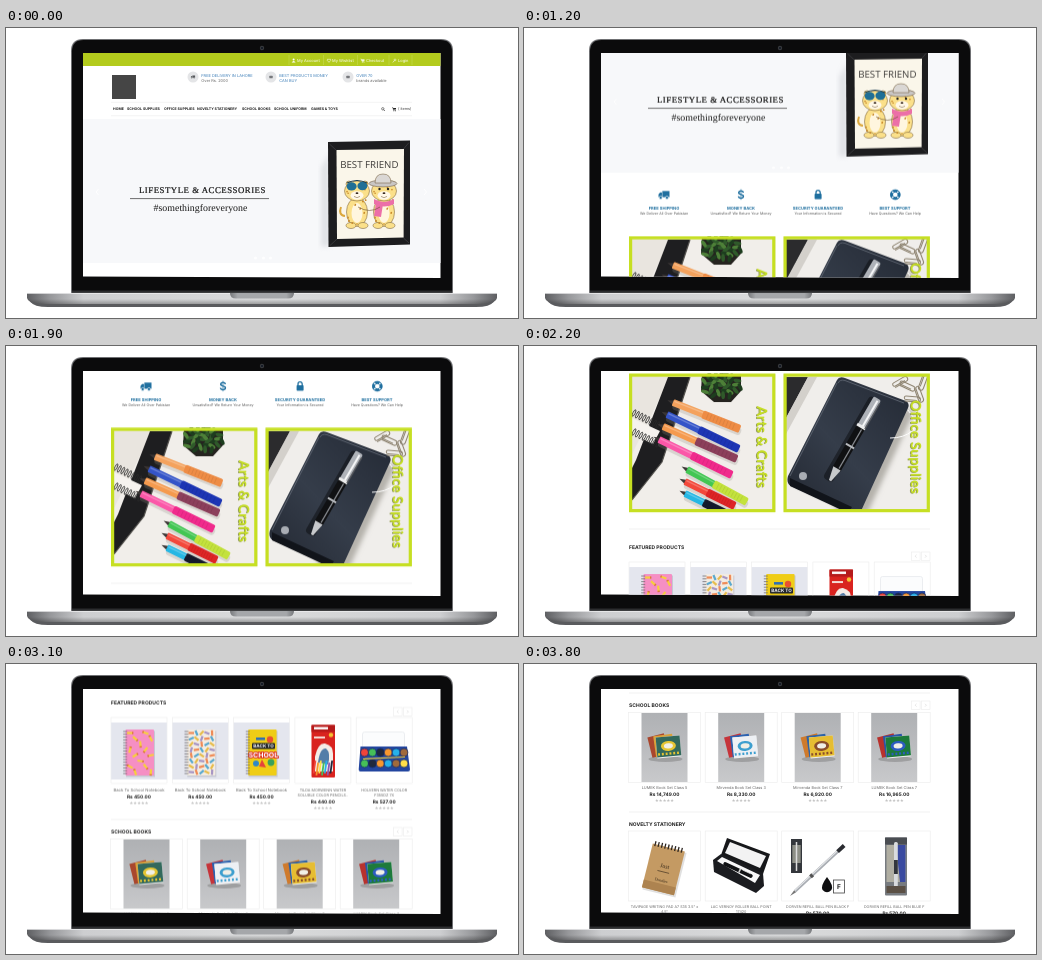
An HTML page for the animation above (5.8 s loop, 512 by 290 pixels).

```html
<!DOCTYPE html>
<html lang="en">
<head>
<meta charset="utf-8">
<title>Stationery shop on a laptop</title>
<style>
html, body { margin: 0; width: 100%; height: 100%; overflow: hidden; background: #fff; }
svg { display: block; width: 512px; height: 290px; }
text { font-family: Inter, "Open Sans", sans-serif; white-space: pre; text-rendering: geometricPrecision; }
.serif { font-family: "Liberation Serif", "Noto Serif", serif; }
.lato { font-family: Lato, "Open Sans", sans-serif; font-weight: 700; }
.hand { font-family: "Open Sans", Lato, sans-serif; }
.b { font-weight: 700; }
.m { text-anchor: middle; }
</style>
</head>
<body>
<svg id="stage" viewBox="0 0 512 290" xmlns="http://www.w3.org/2000/svg"></svg>
<script>
const LOOP = 5800, SCROLL = 560;
const BLUE = '#1f6f9f', LIME = '#c6df22', INK = '#1c1c1c', GREY = '#686868';

// drawing helpers, each returns markup
const rect = (x, y, w, h, fill, more = '') =>
  `<rect x="${x}" y="${y}" width="${w}" height="${h}" fill="${fill}" ${more}/>`;
const box = (x, y, w, h, stroke = '#ececec', more = '') =>
  rect(x, y, w, h, 'none', `stroke="${stroke}" stroke-width=".6" ${more}`);
const oval = (x, y, rx, ry, fill, more = '') =>
  `<ellipse cx="${x}" cy="${y}" rx="${rx}" ry="${ry}" fill="${fill}" ${more}/>`;
const dot = (x, y, r, fill, more) => oval(x, y, r, r, fill, more);
const shape = (d, fill, more = '') => `<path d="${d}" fill="${fill}" ${more}/>`;
const line = (d, stroke, w = 1, more = '') =>
  `<path d="${d}" fill="none" stroke="${stroke}" stroke-width="${w}" ${more}/>`;
const text = (x, y, size, str, fill = INK, cls = '', more = '') =>
  `<text x="${x}" y="${y}" font-size="${size}" fill="${fill}" class="${cls}" ${more}>${str.replace(/&/g, '&amp;')}</text>`;
const at = (x, y, body, turn = 0) => `<g transform="translate(${x} ${y}) rotate(${turn})">${body}</g>`;
const many = (n, fn) => Array.from({ length: n }, (_, i) => fn(i)).join('');
const rule = y => line(`M105 ${y}H406`, '#ebebeb', .7);

const truck = (x, y, s, c) => at(x, y, `<g transform="scale(${s})">` +
  rect(-1.5, -3.6, 6.5, 5.6, c) + shape('M-5 2V-.4L-3.6-2.4H-1.9V2Z', c) +
  dot(-3, 2.4, 1.4, c, 'stroke="#fff" stroke-width=".5"') +
  dot(2.7, 2.4, 1.4, c, 'stroke="#fff" stroke-width=".5"') + '</g>');
const cart = (x, y, c) => line(`M${x - 2} ${y - 1.6}h.9l.6 2.3h2`, c, .5) +
  rect(x - .9, y - 1.2, 2.9, 1.4, c) + dot(x - .2, y + 1.5, .5, c) + dot(x + 1.5, y + 1.5, .5, c);

function header() {
  const links = [[291, 'My Account'], [326, 'My Wishlist'], [360, 'Checkout'], [392, 'Login']];
  const perks = [
    [187, 'FREE DELIVERY IN LAHORE', 'Over Rs. 2000', GREY],
    [265, 'BEST PRODUCTS MONEY', 'CAN BUY', '#3f7fb8'],
    [342, 'OVER 70', 'brands available', GREY]];
  const menu = [[107, 'HOME'], [121, 'SCHOOL SUPPLIES'], [158, 'OFFICE SUPPLIES'],
    [191, 'NOVELTY STATIONERY'], [236, 'SCHOOL BOOKS'], [268, 'SCHOOL UNIFORM'], [305, 'GAMES & TOYS']];
  return rect(76, 24, 360, 14, '#b3cb1d') +
    [283, 317.5, 351.5, 383, 406].map(x => line(`M${x} 27V37`, '#c9db5c', .5)).join('') +
    links.map(([x, s]) => text(x, 34.1, 4, s, '#fff')).join('') +
    dot(287.6, 31.6, 1, '#fff') + shape('M285.6 34.6q2-3.4 4 0Z', '#fff') +
    shape('M323 34.3l-1.9-2.1q.3-2 1.9-.7q1.6-1.3 1.9.7Z', 'none', 'stroke="#fff" stroke-width=".5"') +
    cart(356.5, 32.6, '#fff') + dot(389, 31.9, .9, 'none', 'stroke="#fff" stroke-width=".5"') +
    line('M388.4 32.6l-1.6 1.8', '#fff', .6) +
    rect(106, 47, 24, 24, '#454545') +
    perks.map(([x, a, b, c], i) => dot(x, 49, 5.5, '#e4e5e7') +
      (i ? rect(x - 1.7, 47.8, 3.4, 2.5, '#77797d', 'rx=".5"') : truck(x, 49, .42, '#55575b')) +
      text(x + 8.3, 49, 3.95, a, '#3f7fb8') + text(x + 8.3, 54, 3.95, b, c)).join('') +
    line('M105 74.3H406M105 87.7H406', '#ececec', .6) +
    menu.map(([x, s]) => text(x, 82.4, 3.55, s, INK, 'b')).join('') +
    dot(376.8, 80.8, 1.2, 'none', 'stroke="#333" stroke-width=".6"') + line('M377.6 81.7l1.3 1.3', '#333', .7) +
    cart(388, 81.2, '#222') + text(392, 82.4, 3.8, '( items)', '#444');
}

function leopards() {
  const fur = '#fbe08a', edge = 'stroke="#6b5230" stroke-width=".5"';
  const spots = (x, y, w, h, n) => many(n, i =>
    dot(x + w * Math.sin(i * 2.4), y + h * Math.cos(i * 3.7), .8, '#c98a2b'));
  const body = (x, y) => dot(x - 8, y - 7, 3, fur, edge) + dot(x + 8, y - 7, 3, fur, edge) +
    oval(x, y + 21, 10.5, 14.5, fur, edge) + oval(x, y + 22, 5.5, 10, '#fff6df') +
    oval(x - 6, y + 34.5, 5, 3, fur, edge) + oval(x + 6, y + 34.5, 5, 3, fur, edge) +
    spots(x, y + 21, 9, 12, 17) + oval(x, y, 12.5, 10, fur, edge) + spots(x, y - 2, 10, 6, 9) +
    oval(x, y + 4.5, 6.5, 4.2, '#fff8e8') + oval(x, y + 2.2, 1.4, .9, '#3a2a20') +
    line(`M${x - 3} ${y + 5.4}q3 2.6 6 0`, '#6b5230', .5);
  return line('M339 188q-7-1-4-9', '#dba73c', 2) + body(351, 163) + body(378, 163) +
    oval(345.6, 158.4, 5, 4.2, '#1f6f96') + oval(356.4, 158, 5, 4.2, '#1f6f96') +
    line('M341 155q10-5 20 0', '#163b54', 1.2) +
    oval(377, 155.5, 14, 3.4, '#c9c6c4', edge) + shape('M369 155q0-9 8-9q8 0 8 9Z', '#dad7d4', edge) +
    dot(373.5, 161, 1.2, '#222') + dot(382, 161, 1.2, '#222') +
    shape('M368 171q10 6 20 0v5q-10 5-20 0Z', '#ec6fa8') + shape('M370 175l7 1l-2 13l-7-1Z', '#ec6fa8') +
    line('M352 179q12 7 22 0', '#6b5230', .6);
}

function hero() {
  return rect(76, 91, 360, 144, '#f7f8fa') +
    shape('M323 125L315 140V219L324 218Z', '#c9ccd2', 'filter="url(#soft)" opacity=".5"') +
    shape('M322 114L404 112.5V216.5L322.5 219Z', '#1d1d1f') +
    line('M323.5 116L330 122M403 114.5L397.5 121M403 215L397.5 210M324 217.5L331 211', '#4b4b4e', .6) +
    shape('M330.5 122L398 121L397.6 209.5L331 211Z', '#faf6ea') +
    text(334.2, 140, 9.7, 'BEST FRIEND', '#3c3a38', 'hand') + leopards() +
    text(133, 165.2, 8.8, 'LIFESTYLE & ACCESSORIES', '#151515', 'serif',
      'letter-spacing=".5" stroke="#151515" stroke-width=".2"') +
    line('M124 170.6H263', '#333', .7) +
    text(147.6, 183, 9.9, '#somethingforeveryone', '#1a1a1a', 'serif') +
    line('M92.5 161l-2.5 3l2.5 3M418 161l2.5 3l-2.5 3', '#fff', 1) +
    [249.5, 257.5, 264.5].map(x => dot(x, 230, 1.6, '#fff', 'opacity=".8"')).join('');
}

function services() {
  const items = [
    [140, 'FREE SHIPPING', 'We Deliver All Over Pakistan'],
    [217, 'MONEY BACK', 'Unsatisfied? We Return Your Money'],
    [294, 'SECURITY GUARANTEED', 'Your Information is Secured'],
    [371, 'BEST SUPPORT', 'Have Questions? We Can Help']];
  return truck(140, 257.3, 1.1, BLUE) + text(217, 261, 11.4, '$', BLUE, 'm', 'font-weight="600"') +
    rect(290.6, 256, 7, 5.4, BLUE, 'rx=".7"') +
    line('M292 256.5v-1.8a2.1 2.1 0 0 1 4.2 0v1.8', BLUE, 1.3) +
    dot(371.3, 257, 3.7, 'none', `stroke="${BLUE}" stroke-width="2.8"`) +
    many(4, i => at(371.3, 257, line('M2.8 0H4.5', '#fff', 1.3), 45 + 90 * i)) +
    dot(371.3, 257, 4.9, 'none', `stroke="${BLUE}" stroke-width=".7"`) +
    items.map(([x, a, b]) => text(x, 271.7, 4.1, a, BLUE, 'b m') + text(x, 277.3, 3.6, b, '#555', 'm')).join('');
}

// lime lettering running down a banner, with a darker shadow
const downward = (x, y, size, str) => at(x, y,
  text(.5, .7, size, str, '#6f7d1a', 'lato', 'opacity=".7"') + text(0, 0, size, str, LIME, 'lato'), 90);

// both banners use the same 146 by 138 frame
function crafts() {
  const pen = (x, y, x2, y2, front, back) => {
    const len = Math.hypot(x2 - x, y2 - y);
    return at(x, y, rect(2, -1, len, 7.5, '#8a8680', 'opacity=".25" rx="3"') +
      shape('M-5 0L3-2.6V2.6Z', '#3b3635') + rect(1, -3.5, len * .5, 7, front, 'rx="1"') +
      rect(len * .45, -4.2, len * .55, 8.4, back, 'rx="1.8"') + rect(2, -2.2, len * .42, 1.4, '#fff', 'opacity=".25"') +
      many(9, i => line(`M${len * (.52 + i * .048)}-3V3`, '#0002', .5)),
      Math.atan2(y2 - y, x2 - x) * 180 / Math.PI);
  };
  const coil = (x, y, n) => many(n, i =>
    at(x + i * 3.4, y + i * 1.7, oval(0, 0, 1.1, 3.6, 'none', 'stroke="#2a2a2a" stroke-width=".8"'), 28));
  return rect(105, 28, 147, 138, '#f1eeea') + shape('M108 31H146L108 108Z', '#e9e5df') +
    shape('M144 31H166L138 116L108 154V122L112 114Z', '#1e1e20') + line('M166 31L138 116L108 154', '#55534f', 1.2) +
    shape('M106 71l30 14l-7 13l-23-11Z', '#f6f3ef') + coil(110, 67, 8) + coil(110, 86, 8) +
    shape('M178 28H217V45L207 56H190L177 45Z', '#25231f') +
    many(34, i => at(197 + 20 * Math.sin(i * 2.4) * Math.sqrt(i / 34), 39 + 13 * Math.cos(i * 2.4) * Math.sqrt(i / 34),
      oval(0, 0, 4, 1.9, ['#2f5a2a', '#4d8038', '#1d3d1e'][i % 3]), i * 47)) +
    pen(148, 56, 216, 83, '#f4a25d', '#ee8c45') + pen(142, 68, 215, 103, '#3454c8', '#1d35b4') +
    pen(138, 80, 213, 113, '#f59a4e', '#8c3f5b') + pen(134, 93, 208, 129, '#fb57a8', '#f02a8c') +
    pen(162, 123, 223, 156, '#42c653', '#c3e23c') + pen(160, 135, 211, 160, '#f3483b', '#de2526') +
    pen(160, 147, 203, 168, '#26b7e4', '#151a2d') + downward(233, 60, 14.2, 'Arts & Crafts');
}

function office() {
  const clip = (x, y, turn) => at(x, y,
    line('M-7 2.5H6a2.5 2.5 0 0 0 0-5H-6a1.8 1.8 0 0 0 0 3.6H5', '#8d8370', 1), turn);
  const pen = rect(-46, -3, 95, 11, '#000', 'rx="4" opacity=".4"') +
    rect(-47, -4.2, 33, 8.4, '#aeb2b8', 'rx="2"') + rect(-45, -2.2, 30, 2, '#f5f6f7') +
    rect(-15, -4.6, 50, 9.2, '#101113') + rect(-12, -2.4, 45, 1.3, '#8a8d92') +
    rect(-16, -4.8, 3, 9.6, '#eceded') + rect(7, -4.7, 2, 9.4, '#b9bcc0') +
    shape('M34-4.2L48-1.2V1.2L34 4.2Z', '#c7c9cc') + line('M-44-4.4H-14', '#55585d', 1.4);
  return rect(259, 28, 148, 138, '#f0eeeb') +
    shape('M262 31H284L262 72Z', '#2b2b2d') + shape('M284 31H293L262 88V72Z', '#d3d0cb') +
    shape('M316 42L390 66L343 168H312Z', '#b5b2ac', 'filter="url(#soft)"') +
    shape('M313 34Q315 30 321 32L382 55Q386 57 384 62L337 165H324L267 140Q262 137 264 130Z', 'url(#leather)') +
    line('M314 37Q316 33 321 34.5L380 57M266 130L313 37', '#5a616d', 1) +
    shape('M266 132L328 161L324 167L266 140Z', '#11141a') + dot(279, 130, 4, '#a9adb4') +
    at(330, 93, pen, 120) +
    [[383, 40, 25], [395, 48, 70], [376, 36, -30], [399, 36, 110], [388, 53, 5]].map(c => clip(...c)).join('') +
    line('M384 64Q396 78 388 85T366 92', '#fff', 1) + downward(387, 54, 14, 'Office Supplies');
}

function banners() {
  const frame = x => rect(x + 1.6, 29.1, 143.2, 135.5, 'none', `stroke="${LIME}" stroke-width="3.2"`);
  const clip = x => `<clipPath id="c${x}">${rect(x, 27.5, 146.5, 138.5, '#000')}</clipPath>`;
  return at(0, 271, clip(105) + clip(259.5) +
    `<g clip-path="url(#c105)">${crafts()}</g><g clip-path="url(#c259.5)">${office()}</g>` +
    frame(105) + frame(259.5));
}

const stars = (x, y) => many(5, i => text(x - 7.6 + i * 3.8, y + 1.4, 4, '★', '#c4c4c4', 'm'));
const pager = y => box(387.5, y, 8.6, 8.4) + box(397.4, y, 8.6, 8.4) +
  line(`M392.5 ${y + 2.8}l-1.4 1.4l1.4 1.4M401 ${y + 2.8}l1.4 1.4l-1.4 1.4`, '#ccc', .5);
const heading = (y, s) => text(105, y, 5, s, INK, 'b');
function label(x, y, size, names, price) {
  const end = y + (names.length - 1) * 5.3;
  return names.map((s, i) => text(x, y + i * 5.3, size, s, GREY, 'm')).join('') +
    text(x, end + 7.4, 4.75, 'Rs ' + price, INK, 'b m') + stars(x, end + 11.6);
}

function notebook(x, cover, art) {
  return rect(x - 27.8, 58, 55.6, 57, '#e4e6ee') + rect(x - 13, 66.5, 29, 46, '#9a9caa', 'opacity=".4"') +
    rect(x - 13.5, 65, 28.5, 46, cover, 'rx="1"') + art +
    many(16, i => line(`M${x - 15.8} ${67 + i * 2.8}h4`, '#6e6a70', .8));
}

function featured() {
  const xs = [133, 194.3, 255.6, 316.9, 378.2];
  const grid = (x, fn) => many(40, i => at(x - 9 + (i % 5) * 5.2, 68.5 + (i / 5 | 0) * 5.6, fn(i), i * 67));
  const paints = ['#f0443a', '#f8972e', '#ffe04a', '#46bf58', '#27b0ea', '#8e57b4', '#20283d', '#a06a3c'];
  const pink = grid(133, i => i % 3 ? '' : rect(-3, -1.1, 6, 2.2, '#f7cf3d') + rect(2, -1.1, 1.4, 2.2, '#d9743e'));
  const mixed = grid(194.3, i => rect(-2.7, -1.1, 5.4, 2.2, ['#ef8b57', '#5aa9cf', '#e7bd4d', '#a795c4'][i % 4]));
  const school = rect(246, 78.5, 23, 6, '#23262b', 'rx="1"') + text(257.5, 83.3, 4.6, 'BACK TO', '#fff', 'b m') +
    text(257.3, 92.5, 7, 'SCHOOL', '#fff', 'b m', 'stroke="#dd3029" stroke-width="1.8" paint-order="stroke"') +
    dot(264, 75, 3.2, '#e8512f') + dot(250, 99, 3, '#3088c7') + dot(265, 98, 3.4, '#3ba15a') +
    shape('M256 95l4 8l-7-1Z', '#e5433b') + rect(250, 73, 9, 2.6, '#2d6fb4');
  const pencils = rect(305.5, 60.5, 23.5, 52.5, '#d9231f', 'rx="1"') + rect(305.5, 60.5, 23.5, 7, '#b51a1a') +
    rect(308, 62.5, 14, 2.4, '#fff') + dot(325, 70.5, 2.2, '#f5c332') + rect(308, 72, 11, 2, '#f3d9d4') +
    shape('M309 92q3-14 10-13q8 2 8 10v18h-18Z', '#f4ece6') + shape('M312 98q2-15 8-14q5 4 2 16Z', '#537da8') +
    many(7, i => at(308.5 + i * 2.8, 96 + (i % 2) * 2, rect(0, 0, 1.8, 13, paints[i]), 8));
  const palette = rect(356.5, 67.5, 42, 18, '#fbfcfd', 'rx="2" stroke="#e0e3e8" stroke-width=".6"') +
    shape('M354.5 82H401L404 105Q404 107 402 107H354.5Q352.5 107 352.7 105Z', '#22459f') +
    many(12, i => dot(358.5 + (i % 6) * 7.9, 88 + (i > 5) * 11, 4, paints[(i * 3 + (i > 5)) % 8],
      'stroke="#142a66" stroke-width=".7"')) +
    line('M357 94.5L399 92.500', '#f2cf3c', 1.2);
  const labels = [['Back To School Notebook'], ['Back To School Notebook'], ['Back To School Notebook'],
    ['TILDA MORWENN WATER', 'SOLUBLE COLOR PENCILS..'], ['HOLVERN WATER COLOR', 'F355DZ 7X']];
  const prices = ['450.00', '450.00', '450.00', '440.00', '527.00'];
  return at(0, 434, rule(20) + heading(40, 'FEATURED PRODUCTS') + pager(43) +
    xs.map(x => box(x - 28, 53, 56, 66)).join('') +
    notebook(xs[0], '#f58fc4', pink) + notebook(xs[1], '#f3ece2', mixed) + notebook(xs[2], '#efcd16', school) +
    pencils + palette +
    xs.map((x, i) => label(x, 126.5, i < 3 ? 4.2 : 3.8, labels[i], prices[i])).join(''));
}

const cols = [140.5, 217.2, 293.7, 370.2];

function books() {
  const sets = [['#a9472e', '#d9a23b', '#33695c', '#e5c534'], ['#c6343a', '#2c62b0', '#edf0f4', '#3d9fcf'],
    ['#cf7a2c', '#2f63a6', '#e6bd32', '#8a4d2b'], ['#b8322d', '#2a55a8', '#1d7a3b', '#2d5cc0']];
  const names = ['LUMEK Book Set Class 5', 'Mirvenda Book Set Class 3', 'Mirvenda Book Set Class 7', 'LUMEK Book Set Class 7'];
  const prices = ['14,749.00', '8,330.00', '6,920.00', '16,965.00'];
  const stack = (x, [a, b, c, d]) => oval(x + 1, 95, 17, 3, '#777', 'opacity=".45"') +
    at(x - 6, 81, rect(-9, -10, 17, 21, a), -14) + at(x - 1, 81, rect(-9, -10, 19, 21, b), -8) +
    at(x + 3, 83, rect(-11, -10.5, 24, 21, '#eee') + rect(-11, -10.5, 24, 20, c) +
      oval(1, -1, 7.5, 5, d) + oval(1, -1, 4.5, 2.6, '#f1efe6') +
      many(6, i => rect(-10 + i * 3.8, 5.5, 1.9, 2.4, d)), -5);
  return at(0, 560, rule(29) + heading(42.8, 'SCHOOL BOOKS') + pager(37) +
    cols.map((x, i) => box(x - 36, 48.5, 72, 70) + rect(x - 23, 49, 46, 69, 'url(#table)') + stack(x, sets[i]) +
      label(x, 125, 3.9, [names[i]], prices[i])).join(''));
}

function novelty() {
  const pad = at(140, 205, rect(-16, -21, 34, 46, '#999', 'opacity=".3"') +
    rect(-17, -22, 33, 45, '#c49a63') + rect(-17, 15, 33, 8, '#ad8350') +
    many(9, i => line(`M${-14.5 + i * 3.4}-25v5`, '#2c2520', 1.3)) +
    text(0, -1, 6, 'Just', '#3a2c1c', 'serif m') + line('M-6 3H6', '#3a2c1c', .6) +
    text(0, 13, 4, 'Doodles', '#3a2c1c', 'serif m'), 14);
  const gift = shape('M203 174L246 190L239 210L197 191Z', '#16171a') +
    shape('M206 178L242 192L236 204L201 189Z', '#f2f2f3') +
    shape('M189 196L197 190L239 209L240 222L232 229L190 208Z', '#1b1c20') +
    shape('M193 197L198 193L236 211L231 219Z', '#f7f7f8') +
    at(214, 206, rect(-16, -1.9, 32, 3.8, '#101114', 'rx="1.8"') + rect(1, -2, 1.6, 4, '#ccc') +
      line('M4-1.9H13', '#ddd', .7), 25);
  const refill = rect(267, 175, 11, 34, '#34373c') + rect(268.3, 181, 8.4, 18, '#8d8f86') +
    line('M272.5 178V207', '#dcdcdc', 1.5) +
    at(296, 204, rect(-34, -1.5, 58, 3, '#a9adb3') + rect(-34, -1.2, 58, 1, '#e6e8ea') +
      rect(24, -2, 9, 4, '#2a2c31') + shape('M-34-1.4L-41 0L-34 1.4Z', '#777') + rect(-13, -2, 3, 4, '#555'), -43) +
    shape('M303 213q7 9 4.4 13q-4.4 4.6-8.8 0q-2.4-4 4.4-13Z', '#0e0e10') +
    rect(309.5, 216, 11, 13, '#fff', 'stroke="#444" stroke-width=".8"') + text(315, 225, 6.5, 'F', '#222', 'b m');
  const pack = rect(361, 173.5, 22, 58, '#777b80', 'rx="1"') + rect(362.5, 181, 19, 37, '#b0aea2') +
    shape('M372 181H381.5V218H376Z', '#3a4aa0') + rect(361, 173.5, 22, 7, '#4a4d52') +
    rect(370, 178, 3.8, 45, '#d9dbde', 'rx="1.5"') + rect(370, 196, 3.8, 14, '#33363c') +
    rect(362.5, 222, 19, 7, '#5b5045');
  const names = [['TAVIPAGE WRITING PAD A7 S35 3.5" x', '4.5"'], ['LAC VERNOY ROLLER BALL POINT', '17420'],
    ['DORVEN REFILL BALL PEN BLACK F'], ['DORVEN REFILL BALL PEN BLUE F']];
  return at(0, 560, rule(148) + heading(161.5, 'NOVELTY STATIONERY') +
    cols.map((x, i) => box(x - 36, 167, 72, 70) + label(x, 243.7, 3.7, names[i], '570.00')).join('') +
    pad + gift + refill + pack);
}

function laptop() {
  const base = 'M21 265H491V270Q490 275 478 277H34Q22 275 21 270Z';
  return shape('M65 266V23Q65 11 77 11H435Q447 11 447 23V266Z', '#6f7073') +
    shape('M66 265V23.5Q66 12 77.5 12H434.5Q446 12 446 23.5V265Z', '#0b0b0c') +
    rect(66, 262.5, 380, 2.5, '#2c2d2f') +
    dot(256, 20, 2.2, '#37393d') + dot(256, 20, 1, '#0e1420') +
    shape(base, 'url(#metal)') + shape(base, 'url(#shade)') + line('M21 265.4H491', '#f1f2f3', .8) +
    shape('M24 273.5Q30 276 40 276H472Q482 276 488 273.5Q484 279 470 279H42Q28 279 24 273.5Z', '#5a5b5e') +
    shape('M224 265H288Q288 270.5 282 270.5H230Q224 270.5 224 265Z', 'url(#notch)');
}

const grad = (id, dir, stops) => `<linearGradient id="${id}" ${dir}>` +
  stops.map(([o, c]) => `<stop offset="${o}" stop-color="${c}"/>`).join('') + '</linearGradient>';
const down = 'x1="0" y1="0" x2="0" y2="1"';

document.getElementById('stage').innerHTML = '<defs>' +
  grad('table', down, [[0, '#afb1b4'], [.55, '#bcbdc0'], [1, '#c8c9cb']]) +
  grad('leather', 'x1="0" y1="1" x2="1" y2="0"', [[0, '#232832'], [.45, '#353d4a'], [1, '#242a35']]) +
  grad('metal', '', [[0, '#5e5f62'], [.05, '#97989b'], [.12, '#cdced0'], [.5, '#dadbdc'], [.88, '#cdced0'], [.95, '#97989b'], [1, '#5e5f62']]) +
  grad('shade', down, [[0, '#0000'], [.5, '#0000'], [1, '#0005']]) +
  grad('notch', '', [[0, '#77797c'], [.12, '#a5a7aa'], [.88, '#a5a7aa'], [1, '#77797c']]) +
  '<filter id="soft" x="-30%" y="-30%" width="160%" height="160%"><feGaussianBlur stdDeviation="2.5"/></filter>' +
  '<clipPath id="screen"><path d="M77 25H434.5V250L77 248.6Z"/></clipPath></defs>' +
  laptop() + '<g clip-path="url(#screen)">' + rect(76, 24, 360, 228, '#fff') + '<g id="page">' +
  header() + hero() + services() + banners() + featured() + books() + novelty() + '</g></g>';

// 31 equal jumps, 100 ms apart, then a long rest; 2 ms early so each jump is safely on time
const move = y => `translateY(${-y}px)`;
document.getElementById('page').animate([
  { offset: 0, transform: move(0) },
  { offset: 698 / LOOP, transform: move(0), easing: 'steps(31, end)' },
  { offset: 3798 / LOOP, transform: move(SCROLL) },
  { offset: 1, transform: move(SCROLL) }
], { duration: LOOP, iterations: Infinity });
</script>
</body>
</html>
```
